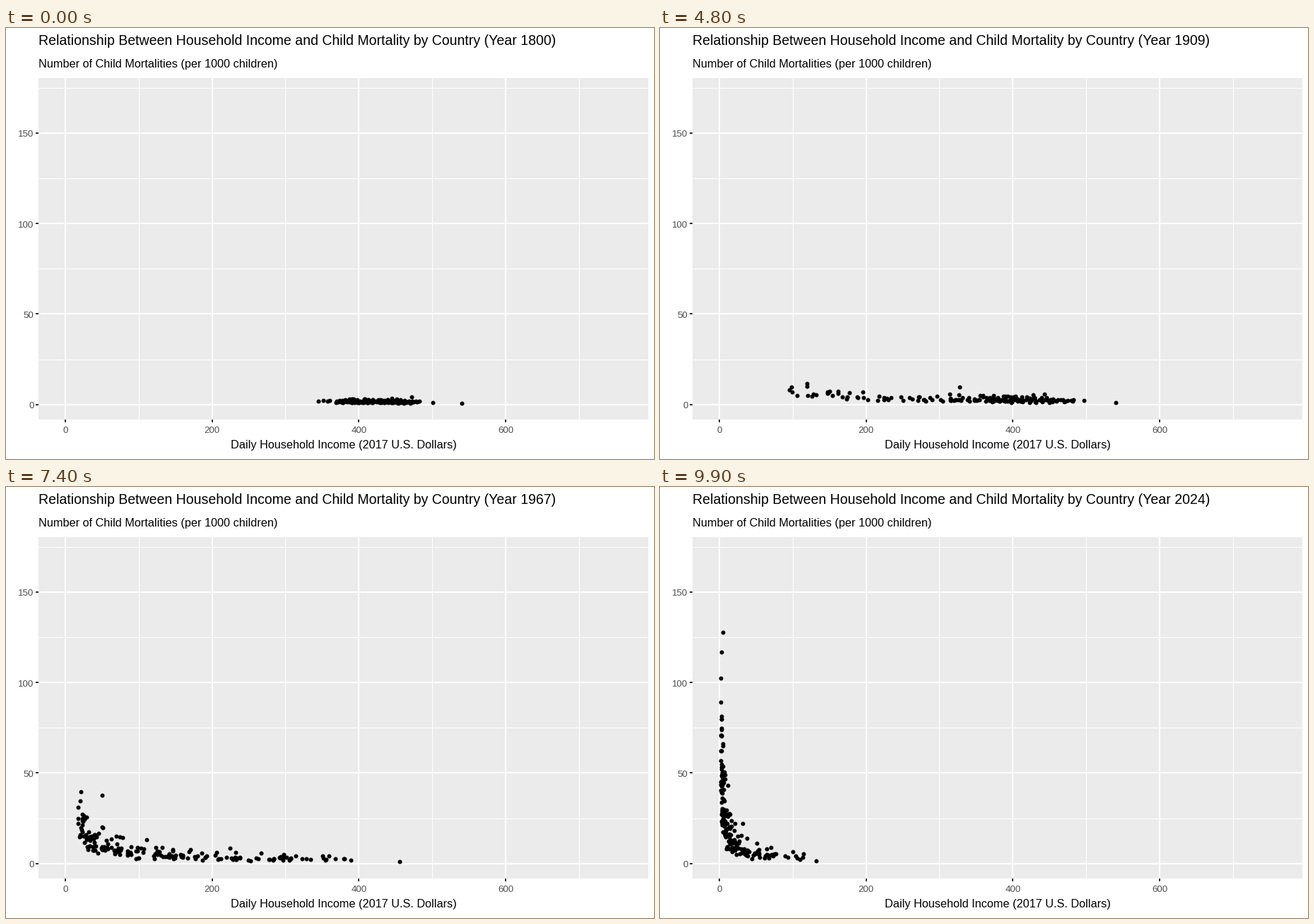
Recreate the animation shown at these times as a matplotlib script. Size 917 by 611 pixels, loop 10 s.

```python
import matplotlib.pyplot as plt
import numpy as np
from matplotlib.animation import FuncAnimation
from matplotlib.patches import Rectangle

W, H, DPI = 917, 611, 128
FRAMES, INTERVAL = 100, 100
X0, Y0, SX, SY = 84, 533.6, 1.0383, 2.563   # stage position of (0, 0), pixels per unit
LEFT, RIGHT, TOP, BOTTOM = 46, 909, 71, 555
PX = 72 / DPI
COUNT = 185

plt.rcParams["font.family"] = "Liberation Sans"
rng = np.random.default_rng(1800)

# Rank 0 leads the decline, rank 1 comes last.
rank = (np.arange(COUNT) + rng.random(COUNT)) / COUNT
plateau = 350 + 166 * rng.beta(2.4, 3.2, COUNT)
plateau[-4] = 540
luck = np.clip(.38 * rng.normal(size=COUNT), -1, .7)
luck[COUNT // 4::COUNT // 4] += .9

# One short crisis for some countries, and one epidemic year for all.
EPIDEMIC = 52
crisis_at = rng.integers(12, 62, COUNT)
crisis = .33 * rng.random(COUNT) * (rng.random(COUNT) < .15)
epidemic = .27 * rng.random(COUNT) ** 2

# Depth of the leaders' decline, and how steeply it fades with rank.
KEYS = [0, 16, 32, 48, 64, 84, 99]
DEPTH = [.17, .68, 1.07, 1.5, 2.25, 4.1, 5.3]
FADE = [22, 22, 9, 5.5, 2.2, .85, .62]


def positions(k):
    depth = np.interp(k, KEYS, DEPTH)
    fade = np.exp(np.interp(k, KEYS, np.log(FADE)))
    x = plateau * np.exp(-depth * (1 - .9 * rank) ** fade)
    wealth = np.interp(k, [0, 50, 64, 84, 99], [165, 250, 250, 170, 115])
    y = wealth * x ** -.77 * np.exp(luck * (.8 + .2 * k / FRAMES))
    x = x * (1 + crisis * np.exp(-np.abs(k - crisis_at)))
    if k == EPIDEMIC:
        x = x * (1 + epidemic)
    return X0 + SX * x, Y0 - SY * y


fig = plt.figure(figsize=(W / DPI, H / DPI), dpi=DPI, facecolor="white")
ax = fig.add_axes([0, 0, 1, 1])
ax.set(xlim=(0, W), ylim=(H, 0))
ax.axis("off")


def line(x1, y1, x2, y2, width, color="white"):
    ax.plot([x1, x2], [y1, y2], color=color, lw=width * PX,
            solid_capstyle="butt", zorder=2)


def label(x, y, s, size, color="black", ha="left"):
    return ax.text(x, y, s, fontsize=size * PX, color=color, ha=ha, va="baseline")


ax.add_patch(Rectangle((LEFT, TOP), RIGHT - LEFT, BOTTOM - TOP,
                       fc="#EBEBEB", ec="none", zorder=1))
for v in range(100, 701, 200):
    line(X0 + v * SX, TOP, X0 + v * SX, BOTTOM, 1)
for v in range(25, 176, 50):
    line(LEFT, Y0 - v * SY, RIGHT, Y0 - v * SY, 1)
for v in range(0, 601, 200):
    x = X0 + v * SX
    line(x, TOP, x, BOTTOM, 2)
    line(x, BOTTOM, x, BOTTOM + 4, 2, "#333333")
    label(x, 574, str(v), 13.2, "#4D4D4D", "center")
for v in range(0, 151, 50):
    y = Y0 - v * SY
    line(LEFT, y, RIGHT, y, 2)
    line(LEFT - 4, y, LEFT, y, 2, "#333333")
    label(39.5, y + 5.3, str(v), 13.2, "#4D4D4D", "right")

title = label(46, 24, "", 19.55)
label(46, 56, "Number of Child Mortalities (per 1000 children)", 16.3)
label(478, 596, "Daily Household Income (2017 U.S. Dollars)", 16.3, ha="center")
dots, = ax.plot([], [], "o", color="black", ms=6 * PX, mew=0,
                antialiased=False, zorder=3)


def update(k):
    year = round(1800 + 224 * k / (FRAMES - 1))
    title.set_text("Relationship Between Household Income and Child Mortality "
                   f"by Country (Year {year})")
    dots.set_data(*positions(k))
    return title, dots


anim = FuncAnimation(fig, update, frames=FRAMES, interval=INTERVAL,
                     repeat=True, repeat_delay=0)
plt.show()
```
